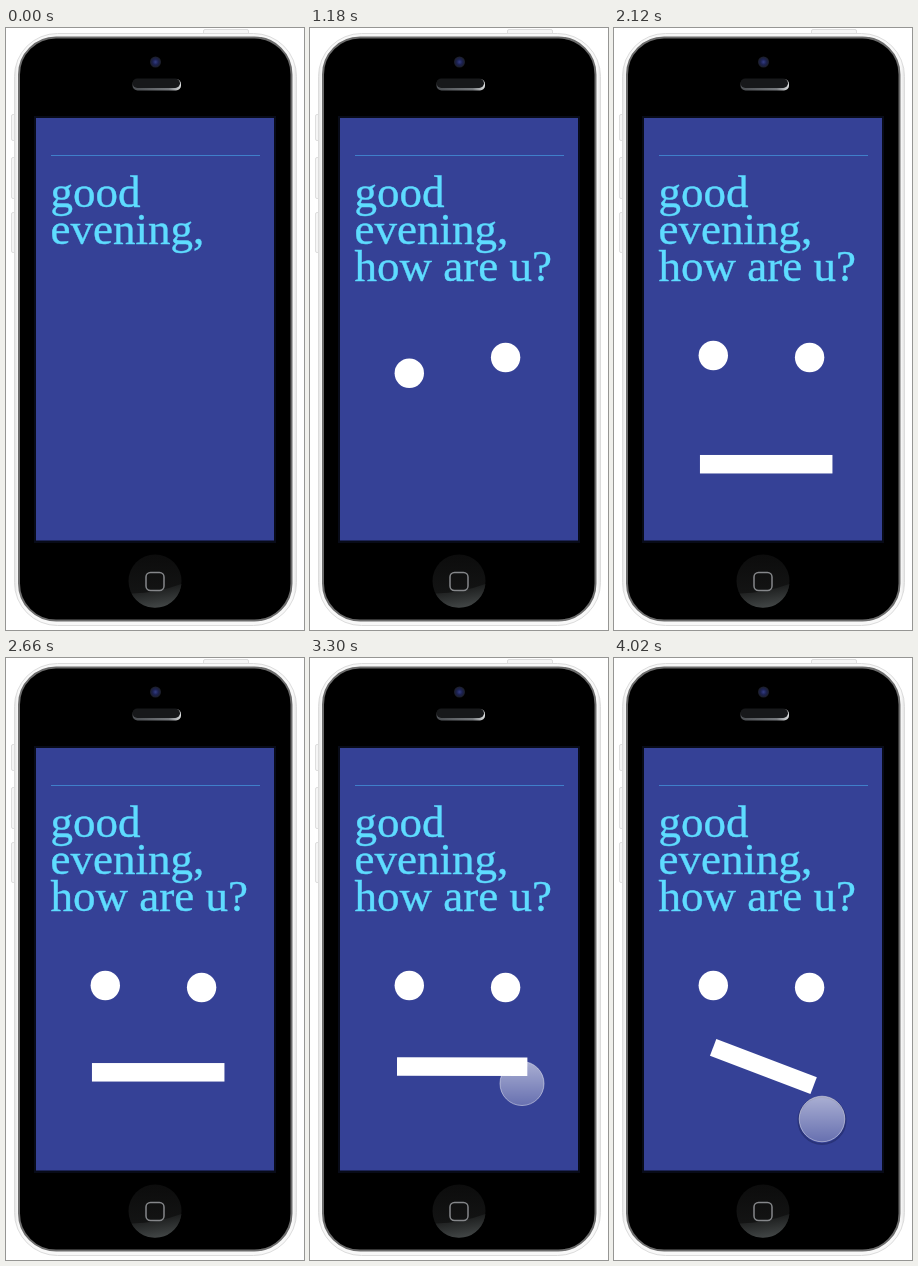
These frames come from a looping animation (298 by 602 pixels, 4.04 s). An HTML page:

```html
<!DOCTYPE html>
<html lang="en">
<head>
<meta charset="utf-8">
<title>Good evening</title>
<style>
  html, body { margin: 0; width: 100%; height: 100%; overflow: hidden; background: #fff; }
  svg { display: block; width: 298px; height: 602px; }
  text {
    font: 45px "Liberation Serif", "Times New Roman", serif;
    fill: #5edcff; stroke: #5edcff; stroke-width: .4px;
  }
</style>
</head>
<body>
<svg viewBox="0 0 298 602">
  <defs>
    <linearGradient id="shell">
      <stop offset="0" stop-color="#e2e2e2"/>
      <stop offset=".012" stop-color="#f8f8f8"/>
      <stop offset=".988" stop-color="#f8f8f8"/>
      <stop offset="1" stop-color="#e2e2e2"/>
    </linearGradient>
    <linearGradient id="home" x2="0" y2="1">
      <stop offset="0" stop-color="#0c0c0c"/>
      <stop offset="1" stop-color="#161717"/>
    </linearGradient>
    <linearGradient id="sheen" x1=".3" y1="0" x2=".6" y2="1">
      <stop offset="0" stop-color="#121313"/>
      <stop offset="1" stop-color="#434747"/>
    </linearGradient>
    <linearGradient id="speaker">
      <stop offset="0" stop-color="#4b4e52"/>
      <stop offset=".75" stop-color="#777a7e"/>
      <stop offset="1" stop-color="#dcdedf"/>
    </linearGradient>
    <radialGradient id="lens">
      <stop offset="0" stop-color="#343d84"/>
      <stop offset=".5" stop-color="#1b2150"/>
      <stop offset="1" stop-color="#1c1e26"/>
    </radialGradient>
    <linearGradient id="glass" x2="0" y2="1">
      <stop offset="0" stop-color="#fff" stop-opacity=".58"/>
      <stop offset="1" stop-color="#fff" stop-opacity=".25"/>
    </linearGradient>
    <clipPath id="faceClip"><rect x="30" y="90" width="238" height="385"/></clipPath>
    <clipPath id="lineClip"><rect x="30" y="220" width="238" height="43"/></clipPath>
  </defs>

  <!-- phone -->
  <g fill="#f5f5f5" stroke="#dedede">
    <rect x="5.5" y="86.5" width="6" height="26" rx="1.5"/>
    <rect x="5.5" y="129.5" width="6" height="41" rx="1.5"/>
    <rect x="5.5" y="184.5" width="6" height="40" rx="1.5"/>
    <rect x="197.5" y="1.5" width="45" height="8" rx="1.5"/>
  </g>
  <rect x="8.5" y="5.5" width="282" height="592" rx="43" fill="url(#shell)" stroke="#dcdcdc"/>
  <rect x="13" y="9.5" width="272.5" height="583" rx="37" stroke="#6c6c6c" stroke-width="2"/>
  <circle cx="149.5" cy="34" r="5.5" fill="url(#lens)"/>
  <rect x="126.5" y="51" width="48.5" height="11.5" rx="5" fill="url(#speaker)"/>
  <rect x="126.5" y="50.5" width="47.5" height="9.5" rx="4.75" fill="#17181a"/>
  <circle cx="149" cy="553" r="26.5" fill="url(#home)"/>
  <path d="M125.5 565.5Q151 565 175.4 556A26.5 26.5 0 0 1 125.5 565.5" fill="url(#sheen)"/>
  <rect x="140" y="544.5" width="18" height="18" rx="4.5" fill="none" stroke="#85878a" stroke-width="1.5"/>

  <!-- screen -->
  <rect x="28" y="88" width="242" height="427" fill="#080b18"/>
  <rect x="30" y="90" width="238" height="422.5" fill="#354196"/>
  <path d="M45 127.5H254" stroke="#407fca"/>
  <text x="44.5" y="178.7">good</text>
  <text x="44.5" y="216.2">evening,</text>
  <g clip-path="url(#lineClip)"><text id="question" x="44.5">how are u?</text></g>
  <g clip-path="url(#faceClip)" fill="#fff">
    <circle id="leftEye" cx="99.3" r="14.7"/>
    <circle id="rightEye" cx="195.6" r="14.7"/>
    <rect id="mouth"/>
  </g>
  <g id="touch">
    <circle id="shadow" cy="1.5" r="23.5" fill="none" stroke="#1b2358" stroke-width="2"/>
    <circle id="disc" r="22" fill="url(#glass)" stroke="#fff" stroke-opacity=".45"/>
  </g>
</svg>
<script>
const LOOP = 4040;
const el = id => document.getElementById(id);
const set = (id, attrs) => {
  for (const key in attrs) el(id).setAttribute(key, attrs[key]);
};
const mix = (a, b, p) => a + (b - a) * p;

// Sine ease-in-out progress between two times.
const ease = (t, start, end) => {
  const u = Math.min(1, Math.max(0, (t - start) / (end - start)));
  return (1 - Math.cos(Math.PI * u)) / 2;
};

function draw(t) {
  set('question', { y: mix(299, 253.2, ease(t, 20, 540)) });
  set('leftEye', { cy: mix(491, 327.5, ease(t, 574, 1346)) });
  set('rightEye', { cy: mix(491, 329.5, ease(t, 790, 1170)) });

  const turn = ease(t, 3260, 4020);
  const mouthY = mix(487, 414.3, ease(t, 1612, 2420)) - 5.6 * ease(t, 2760, 3280);
  const width = mix(132.5, 107.5, turn) - 2 * ease(t, 3100, 3300) * (1 - turn);
  const x = mix(152.2, 149.3, turn);
  set('mouth', {
    x: x - width / 2, y: mouthY - 9.25, width, height: mix(18.5, 18, turn),
    transform: `rotate(${20.8 * turn} ${x} ${mouthY})`
  });

  const enter = ease(t, 2660, 3240);
  const drag = ease(t, 3290, 3960);
  const touchX = mix(322, 212, enter) - 4 * drag;
  const touchY = mix(482, 425.5, enter) + 35.5 * drag;
  set('touch', {
    transform: `translate(${touchX} ${touchY})`,
    visibility: t > 2665 ? 'visible' : 'hidden'
  });
  set('disc', { r: mix(22, 22.8, drag) });
  set('shadow', { opacity: 0.45 * drag });
}

const begin = performance.now();
function tick() {
  draw((performance.now() - begin) % LOOP);
  requestAnimationFrame(tick);
}
draw(0);
requestAnimationFrame(tick);
</script>
</body>
</html>
```
